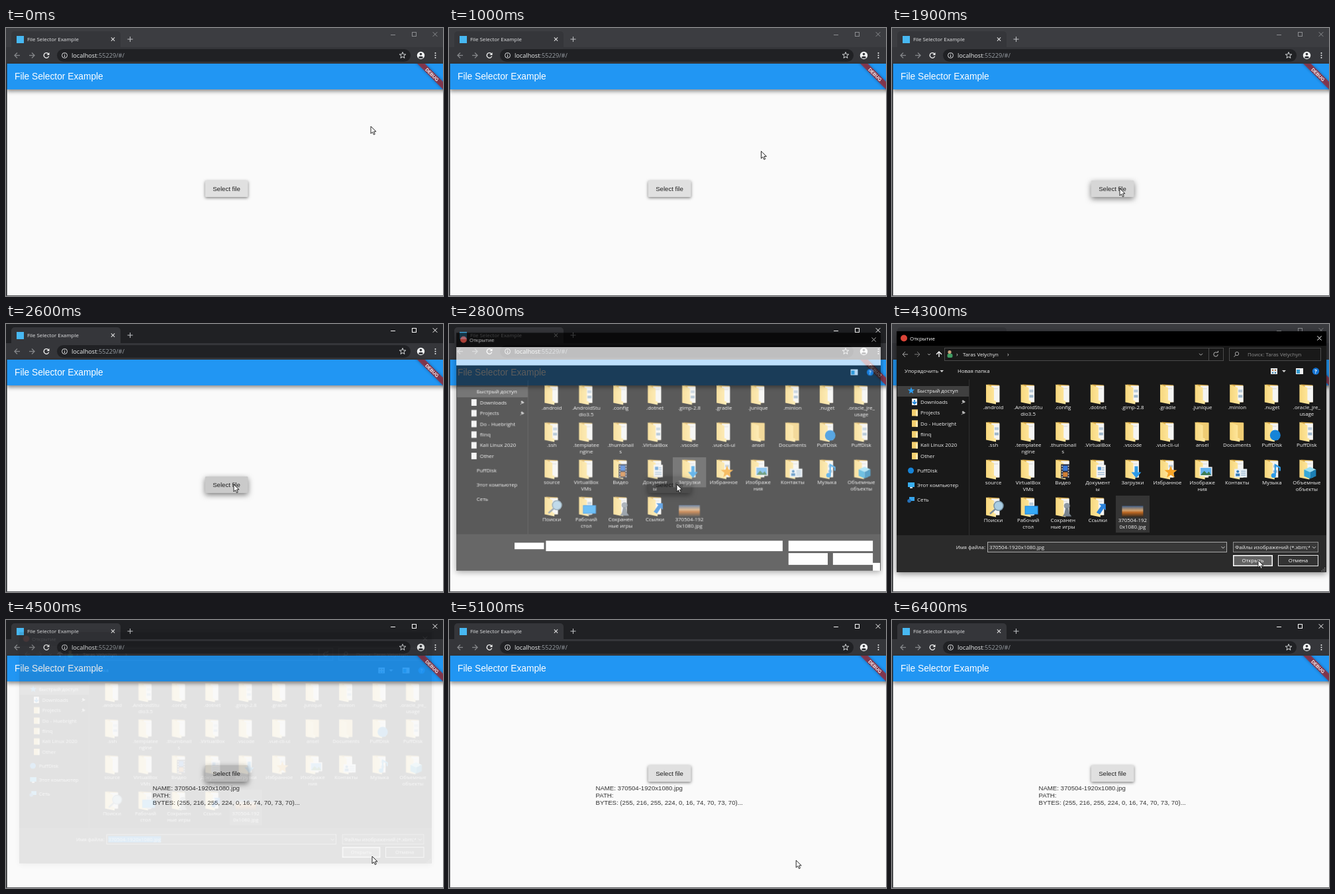
An HTML page with a canvas that plays this animation: 660 by 406 pixels, repeating every 6500 ms.

```html
<!DOCTYPE html>
<html lang="en">
<head>
<meta charset="utf-8">
<title>File Selector Example</title>
<style>
html, body { margin: 0; width: 100%; height: 100%; overflow: hidden; background: #fafafa; }
canvas { display: block; width: 660px; height: 406px; }
</style>
</head>
<body>
<canvas id="stage" width="660" height="406"></canvas>
<script>
const W = 660, H = 406, LOOP = 6500, STEP = 100;
const UI = '"Open Sans", "Noto Sans", sans-serif';
const APP = '"Liberation Sans", Arial, sans-serif';
const USER = 'Taras Velychyn', CLOUD = 'PuffDisk', FILE = '370504-1920x1080.jpg';
const screen = document.getElementById('stage').getContext('2d');
const layer = document.createElement('canvas');
layer.width = W;
layer.height = H;
const layerCtx = layer.getContext('2d');
let g = screen;

// ---- drawing helpers ----
function rect(x, y, w, h, fill) {
  g.fillStyle = fill;
  g.fillRect(x, y, w, h);
}
function box(x, y, w, h, stroke, fill, width = 1) {
  if (fill) rect(x, y, w, h, fill);
  g.strokeStyle = stroke;
  g.lineWidth = width;
  g.strokeRect(x + width / 2, y + width / 2, w - width, h - width);
}
function round(x, y, w, h, r, fill) {
  g.beginPath();
  g.roundRect(x, y, w, h, r);
  g.fillStyle = fill;
  g.fill();
}
function circle(x, y, r, fill) {
  g.beginPath();
  g.arc(x, y, r, 0, Math.PI * 2);
  g.fillStyle = fill;
  g.fill();
}
function ring(x, y, r, color, width = 1, from = 0, to = Math.PI * 2) {
  g.beginPath();
  g.arc(x, y, r, from, to);
  g.strokeStyle = color;
  g.lineWidth = width;
  g.stroke();
}
function trace(points) {
  g.beginPath();
  for (let i = 0; i < points.length; i += 2) g.lineTo(points[i], points[i + 1]);
}
function line(color, width, ...points) {
  trace(points);
  g.strokeStyle = color;
  g.lineWidth = width;
  g.stroke();
}
function poly(fill, ...points) {
  trace(points);
  g.closePath();
  g.fillStyle = fill;
  g.fill();
}
function star(x, y, r) {
  const points = [];
  for (let i = 0; i < 10; i++) {
    const a = Math.PI * (i / 5 - 0.5), d = i % 2 ? r * 0.42 : r;
    points.push(x + d * Math.cos(a), y + d * Math.sin(a));
  }
  return points;
}
function text(s, x, y, color = '#f2f2f2', size = 7.9, align = 'left', family = UI, weight = 400) {
  g.font = `${weight} ${size}px ${family}`;
  g.textAlign = align;
  g.fillStyle = color;
  g.fillText(s, x, y);
}
function cross(x, y, r, color, width = 1) {
  line(color, width, x - r, y - r, x + r, y + r);
  line(color, width, x - r, y + r, x + r, y - r);
}
function chevron(x, y, color, r = 2.5) {
  line(color, 1, x - r, y - r / 2, x, y + r / 2, x + r, y - r / 2);
}
function arrow(x, y, angle, color, r = 4, width = 1.3) {
  g.save();
  g.translate(x, y);
  g.rotate(angle);
  line(color, width, -r, 0, r, 0);
  line(color, width, 0, -r, r, 0, 0, r);
  g.restore();
}
function shadow(blur, y, alpha) {
  g.shadowBlur = blur;
  g.shadowOffsetY = y;
  g.shadowColor = `rgba(0,0,0,${alpha})`;
}

// ---- browser window ----
function drawBrowser(t) {
  const active = (t >= 2000 && t < 2900) || t >= 4400;
  const control = active ? '#ffffff' : '#8b8d90';
  rect(0, 0, W, 54, active ? '#202124' : '#3c3d41');
  round(8, 5, 165, 30, [5, 5, 0, 0], '#35363a');
  rect(0, 29, W, 25, '#35363a');
  rect(16, 12, 11, 11, '#47b8f2');
  text('File Selector Example', 32, 20, '#e4e5e7');
  cross(161.5, 17, 2.6, '#e0e0e0', 1.1);
  line('#b8babd', 1.1, 183.5, 17, 191.5, 17);
  line('#b8babd', 1.1, 187.5, 13, 187.5, 21);
  line(control, 1, 581, 10.5, 588, 10.5);
  box(613, 6, 7, 7, control);
  cross(648, 9.5, 3.3, control);

  arrow(17, 41.5, Math.PI, '#85878a');
  arrow(39, 41.5, 0, '#85878a');
  ring(61, 41.5, 3.8, '#f1f1f1', 1.4, 0.3, 5.6);
  poly('#f1f1f1', 65.5, 37, 65.5, 41, 61.5, 41);
  round(77, 32, 534, 19, 9.5, '#202124');
  ring(88.5, 41.5, 4, '#dedfe1');
  line('#dedfe1', 1.1, 88.5, 41, 88.5, 44);
  rect(88, 39, 1, 1, '#dedfe1');
  text('localhost', 99, 44.6, '#f1f3f4', 9.2);
  const hostWidth = g.measureText('localhost').width;
  text(':55229/#/', 99 + hostWidth, 44.6, '#9aa0a6', 9.2);
  g.beginPath();
  trace(star(599, 41.5, 5));
  g.closePath();
  g.strokeStyle = '#e8eaed';
  g.lineWidth = 0.9;
  g.stroke();
  circle(626.5, 41.5, 5.7, '#f1f3f4');
  circle(626.5, 39.6, 1.8, '#35363a');
  g.beginPath();
  g.ellipse(626.5, 44.4, 3.3, 1.6, 0, 0, Math.PI * 2);
  g.fill();
  for (const y of [38, 41.5, 45]) circle(648.5, y, 1, '#f1f3f4');

  rect(0, 54, W, 352, '#fafafa');
  g.save();
  shadow(6, 2.5, 0.45);
  rect(1, 54, W + 4, 39, '#2196f3');
  g.restore();
  rect(0, 54, 1.6, 352, '#292a2d');
  rect(0, 405, W, 1, '#55565a');
  text('File Selector Example', 13, 78, '#ffffff', 13.75, 'left', APP);
  drawRibbon();
  drawPage(t);
}
function drawRibbon() {
  g.save();
  g.beginPath();
  g.rect(0, 54, W, 60);
  g.clip();
  g.translate(W, 54);
  g.rotate(Math.PI / 4);
  shadow(4, 0, 0.5);
  rect(-40, 19.25, 80, 8.25, 'rgba(183,28,28,.66)');
  g.shadowColor = 'transparent';
  text('DEBUG', 0, 25.9, '#ffffff', 7, 'center', APP, 700);
  g.restore();
}
function drawPage(t) {
  const done = t >= 4500, y = done ? 220 : 231;
  const pressed = t >= 2000 && t < 4600, hovered = t >= 1500 && t < 4600;
  g.save();
  if (hovered) shadow(8, 3, 0.5); else shadow(4, 1.5, 0.5);
  round(300.7, y, 64.8, 25, 1.5, pressed ? '#cacaca' : hovered ? '#d6d6d6' : '#e0e0e0');
  g.restore();
  text('Select file', 333, y + 16, '#212121', 9.625, 'center', APP);
  if (!done) return;
  ['NAME: ' + FILE, 'PATH:', 'BYTES: (255, 216, 255, 224, 0, 16, 74, 70, 73, 70)...']
    .forEach((s, i) => text(s, 221.5, 258 + i * 11, '#333333', 9.625, 'left', APP));
}

// ---- file icons, drawn around the origin ----
const BLUE = '#2e9be6';
const badges = {
  disk() { circle(5, 5, 8, '#1684d8'); },
  film() {
    rect(-3, -8, 13, 21, '#252a3a');
    for (let y = -6; y < 12; y += 4) {
      rect(-2, y, 1.5, 2, '#ddd');
      rect(7.5, y, 1.5, 2, '#ddd');
    }
    rect(0, -6, 7, 8, '#3877d6');
    rect(0, 4, 7, 7, '#d07f36');
  },
  sheet() {
    rect(-2, -7, 14, 19, '#f4f4f4');
    rect(0, -4, 5, 5, '#4f93d2');
    for (const y of [-3, 0, 4, 7]) rect(y < 3 ? 6 : 0, y, y < 3 ? 4 : 10, 1, '#7aa3ca');
  },
  down() { poly(BLUE, 3, -5, 8, -5, 8, 4, 13, 4, 5.5, 13, -2, 4, 3, 4); },
  star() { poly('#f6a428', ...star(5, 4, 10)); },
  picture() {
    rect(-4, -4, 19, 14, '#eeeeee');
    rect(-2.5, -2.5, 16, 11, '#66b4ef');
    poly('#3d7d55', -2.5, 8.5, 3, 2, 7, 6, 10, 3, 13.5, 8.5);
  },
  card() {
    rect(-4, -1, 19, 13, '#e9f1f7');
    circle(1, 3, 2, '#397db8');
    rect(-2, 6, 6, 4, '#397db8');
    for (const y of [2, 5, 8]) rect(6, y, 7, 1, '#81a6c4');
  },
  note() {
    line(BLUE, 2.2, 5, 8, 5, -7, 12, -3, 12, 2);
    circle(2.5, 9, 3.6, BLUE);
  },
  cube() {
    poly('#9be0f5', 5, -4, 14, 0, 5, 4, -4, 0);
    poly('#37a9d8', -4, 0, 5, 4, 5, 14, -4, 10);
    poly('#1c7fb5', 14, 0, 5, 4, 5, 14, 14, 10);
  },
  search() {
    line('#7d8c98', 2.4, 3, 3, -5, 10);
    circle(8, -2, 7, '#a9cde3');
    ring(8, -2, 7, '#7a96a8', 1.6);
  },
  monitor() {
    rect(-5, -2, 20, 13, '#1f87e0');
    rect(-4, -1, 18, 11, '#35a8f5');
    rect(2, 11, 6, 2, '#a9bccb');
  },
  pawn() {
    circle(6, -2, 4.5, '#8f99a3');
    poly('#77828d', 4, 1, 8, 1, 10, 10, 13, 14, -1, 14, 2, 10);
  },
  link() {
    poly('#2b83dc', 2, -5, 12, -5, 12, 5, 9, 2, 3, 11, -2, 8, 5, -2);
  }
};
function folder(kind, seed) {
  poly('#d8aa48', -9, -15, 9, -14, 9, 12, -9, 12);
  if (kind !== 'empty') {
    poly('#f5f5f3', -3, -13, 9.5, -13, 9.5, 12, -3, 12);
    if (seed % 3 === 1) {
      rect(2, -7, 6, 4, '#b9cad8');
      rect(2, 1, 6, 4, '#9db6ca');
    } else rect(1, -9, 6, 1, '#d5d5d5');
  } else poly('#f0cd74', -9, -14, 10, -14, 10, 13, -9, 13);
  const skin = g.createLinearGradient(-11, 0, 4, 0);
  skin.addColorStop(0, '#f7d77d');
  skin.addColorStop(1, '#ffe8a0');
  poly(skin, -11, -15, 1, -10, 1, 9, 4, 10, 4, 15, -11, 12);
  if (badges[kind]) badges[kind]();
}
function thumbnail() {
  const sky = g.createLinearGradient(0, -9, 0, 8);
  sky.addColorStop(0, '#3f5d86');
  sky.addColorStop(0.4, '#d0a06d');
  sky.addColorStop(0.6, '#b7631f');
  sky.addColorStop(1, '#302a22');
  rect(-16, -2, 32, 17, '#302a22');
  g.save();
  g.translate(0, 7);
  rect(-16, -9, 32, 17, sky);
  g.restore();
}

// Each entry is "label|second line:kind"; rows are separated by slashes.
const rows = [
  '.android,.AndroidStu|dio3.5,.config,.dotnet,.gimp-2.8,.gradle,.junique,.minion,.nuget,.oracle_jre_|usage',
  `.ssh,.templatee|ngine,.thumbnail|s,.VirtualBox,.vscode,.vue-cli-ui,ansel:empty,Documents:empty,${CLOUD}:disk,${CLOUD}`,
  'source,VirtualBox|VMs,Видео:film,Документ|ы:sheet,Загрузки:down,Избранное:star,Изображе|ния:picture,Контакты:card,Музыка:note,Объемные|объекты:cube',
  'Поиски:search,Рабочий|стол:monitor,Сохранен|ные игры:pawn,Ссылки:link,370504-192|0x1080.jpg:thumb'
].map(row => row.split(',').map(item => {
  const [label, kind = 'docs'] = item.split(':');
  return { lines: label.split('|'), kind };
}));

// ---- dialog ----
function drawGrid(t) {
  if (t >= 3500) rect(338, 260, 51, 56, '#353535');
  else if (t >= 2700 && t < 3400) rect(338, 202, 51, 46, '#444444');
  rows.forEach((row, r) => row.forEach(({ lines, kind }, c) => {
    const x = 153 + c * 52.6, y = 106.5 + r * 57;
    g.save();
    g.translate(x, y);
    if (kind === 'thumb') thumbnail(); else folder(kind, r + c);
    g.restore();
    lines.forEach((s, i) => text(s, x, y + 22.5 + i * 9.6, '#f4f4f4', 7.9, 'center'));
  }));
}
function drawSidebar(partial) {
  rect(8, 94, 109, 16, '#404040');
  rect(116, 84, 1, 236, '#303030');
  ['Downloads', 'Projects', 'Do - Huebright', 'flinq', 'Kali Linux 2020', 'Other'].forEach((s, i) => {
    const y = 118 + i * 16.4;
    text(s, 43, y + 2.8);
    if (partial || i === 0) {
      rect(30, y - 5, 8, 10, '#f3f3f3');
      if (!partial) arrow(34, y, Math.PI / 2, '#2186dc', 3, 1.8);
    } else {
      rect(30, y - 5, 9, 10, '#f4d06f');
      rect(36, y - 3, 3, 8, '#ffeab0');
    }
    if (i < 2) {
      line('#b8b8b8', 1, 105, y + 3, 108, y);
      poly('#b8b8b8', 107, y - 3, 111, y, 108, y + 2, 105.5, y - 1);
    }
  });
  [['Быстрый доступ', 101], [CLOUD, 222], ['Этот компьютер', 244], ['Сеть', 266]]
    .forEach(([s, y]) => text(s, 38, y + 2.8));
  if (partial) return;
  poly('#2d9df0', ...star(29, 101, 5.5));
  circle(28.5, 222, 4.5, '#1684d8');
  rect(24, 240, 10, 7, '#38aef0');
  rect(27, 247, 4, 2, '#c8d3da');
  rect(26, 262, 8, 6, '#37a4ea');
  circle(26, 268, 2.8, '#2671b9');
}
function drawHeader(partial) {
  rect(7, 11, 649, 22, '#000000');
  circle(18, 21.5, 5, '#db4437');
  text('Открытие', 27, 24.5, '#ffffff');
  cross(645.5, 21.5, 3.2, '#ffffff');
  if (partial) rect(7, 33, 649, 28, '#ffffff');
  else {
    arrow(20, 46, Math.PI, '#a8a8a8', 4, 1);
    arrow(38, 46, 0, '#7c7c7c', 4, 1);
    chevron(56, 46, '#a0a0a0', 2);
    arrow(71, 46, -Math.PI / 2, '#ffffff', 4, 1.4);
    box(79, 36, 422, 20, '#4b4b4b');
    rect(478, 37, 1, 18, '#4b4b4b');
    circle(87, 42.5, 2.6, '#c9a27a');
    round(83.5, 45, 8, 6, 2, '#3f9c63');
    text('›', 97, 49, '#dddddd', 9);
    text(USER, 107, 48.8);
    text('›', 174, 49, '#dddddd', 9);
    chevron(466.5, 46, '#b5b5b5');
    ring(489, 46, 3.2, '#b5b5b5', 1, 0, 5.2);
    line('#b5b5b5', 1, 490, 43, 492.5, 43, 492.5, 40.8);
    box(509, 36, 139, 20, '#4b4b4b');
    ring(521, 45, 2.7, '#a0a0a0');
    line('#a0a0a0', 1, 519, 47, 516.5, 50);
    text('Поиск: ' + USER, 537, 48.8, '#8f8f8f');
    text('Упорядочить', 19, 74);
    poly('#cfcfcf', 72.5, 70, 78, 70, 75.2, 73.2);
    text('Новая папка', 99, 74);
    box(572, 67, 10, 9, '#e8e8e8', '#d8e2e8');
    for (const x of [574, 578]) {
      rect(x, 69, 2, 2, '#b8713b');
      rect(x, 73, 2, 2, '#397fa9');
    }
    poly('#cfcfcf', 589, 70, 595, 70, 592, 73.2);
  }
  rect(610, 67, 11, 9, '#f0f0f0');
  rect(611, 69, 5, 6, '#379dd0');
  circle(640, 71.5, 5.2, '#1474d4');
  text('?', 640, 74.5, '#ffffff', 8, 'center', UI, 700);
}
function drawFooter(t, partial) {
  rect(7, 320, 649, 56, '#2b2b2b');
  if (partial) {
    [[96, 333, 45, 10], [144, 330, 362, 16], [515, 330, 129, 16], [515, 349, 60, 18], [583, 349, 61, 18], [644, 364, 11, 12]]
      .forEach(r => rect(...r, '#ffffff'));
    return;
  }
  text('Имя файла:', 141, 341, '#f2f2f2', 7.9, 'right');
  box(144, 330, 362, 16, '#a8a8a8', '#383838');
  chevron(500, 338.5, '#d5d5d5');
  if (t >= 3600) {
    g.font = '7.9px ' + UI;
    if (t >= 4400) rect(147, 333, g.measureText(FILE).width, 10, '#0078d7');
    text(FILE, 147, 341);
  } else rect(147, 333, 1, 10, '#ffffff');
  box(515, 330, 129, 16, '#8f8f8f', '#383838');
  g.save();
  g.beginPath();
  g.rect(516, 331, 115, 14);
  g.clip();
  text('Файлы изображений (*.xbm;*', 518, 341);
  g.restore();
  chevron(637.5, 338.5, '#d5d5d5');
  box(515, 350, 60, 17, '#ffffff', t >= 4200 ? '#626262' : '#333333', 1.5);
  text('Открыть', 545, 361.3, '#ffffff', 7.9, 'center');
  box(583, 350, 61, 17, '#e5e5e5', '#333333');
  text('Отмена', 613.5, 361.3, '#ffffff', 7.9, 'center');
  for (let i = 0; i < 3; i++)
    for (let j = 0; j <= i; j++) rect(653 - j * 2.3, 369 + i * 2.3, 1.2, 1.2, '#9c9c9c');
}
function drawDialog(t) {
  const partial = t < 2900;
  g = layerCtx;
  g.clearRect(0, 0, W, H);
  g.save();
  shadow(9, 2, 0.5);
  rect(7, 11, 649, 365, '#191919');
  g.restore();
  drawHeader(partial);
  drawSidebar(partial);
  drawGrid(t);
  drawFooter(t, partial);
  g = screen;
}
function showDialog(t) {
  if (t <= 2700 || t >= 4600) return;
  const opening = Math.min(1, (t - 2700) / 200);
  const closing = Math.max(0, (t - 4300) / 200);
  const scale = 1 - 0.05 * (1 - opening) ** 2 - 0.04 * closing ** 1.5;
  drawDialog(t);
  g.save();
  g.globalAlpha = Math.min(1, opening * 1.42) * (1 - 0.9 * closing);
  g.translate(331.5, 193.5);
  g.scale(scale, scale);
  g.drawImage(layer, -331.5, -193.5);
  g.restore();
}

// ---- pointer: time, x, y ----
const path = [
  [0, 551, 149], [700, 551, 154], [1400, 349, 237], [1500, 344, 243], [3000, 344, 243],
  [3500, 360, 284], [3600, 360, 284], [4200, 553, 358], [4900, 553, 358], [5800, 325, 406]
];
function drawPointer(t) {
  const i = path.findIndex(p => p[0] > t);
  if (i < 0) return;
  const [t0, x0, y0] = path[i - 1], [t1, x1, y1] = path[i];
  const p = (t - t0) / (t1 - t0), e = p * p * (3 - 2 * p);
  g.save();
  g.translate(x0 + (x1 - x0) * e, y0 + (y1 - y0) * e);
  poly('#ffffff', 0, 0, 0, 11, 2.6, 8.6, 4.4, 12.6, 6.2, 11.8, 4.5, 7.9, 8, 7.9);
  g.strokeStyle = '#111111';
  g.lineWidth = 0.9;
  g.stroke();
  g.restore();
}

const start = performance.now();
function frame() {
  const elapsed = (performance.now() - start) % LOOP;
  const t = Math.floor(elapsed / STEP) * STEP;
  drawBrowser(t);
  showDialog(t);
  drawPointer(t);
  requestAnimationFrame(frame);
}
frame();
</script>
</body>
</html>
```
